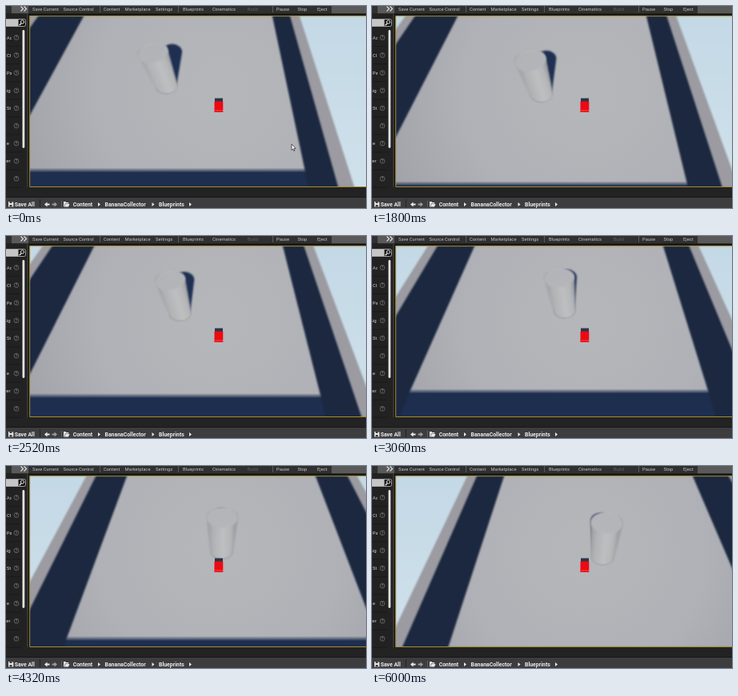
An HTML page with a canvas for the animation above (6030 ms loop, 450x253 px).

```html
<!DOCTYPE html>
<html lang="en">
<head>
<meta charset="utf-8">
<title>Level editor viewport</title>
<style>
  html, body { margin: 0; width: 100%; height: 100%; overflow: hidden; background: #242425; }
  canvas, svg { position: absolute; left: 0; top: 0; width: 450px; height: 253px; }
  text { font-family: Roboto, "Open Sans", sans-serif; }
  .tool { font-size: 5.8px; fill: #c4c4c4; }
  .crumb { font-size: 6.9px; font-weight: 700; fill: #ececec; }
  .side { font-size: 6px; fill: #cfcfcf; }
  .help { font-size: 5px; fill: #8c8c8c; text-anchor: middle; }
</style>
</head>
<body>
<canvas id="view" width="450" height="253"></canvas>
<svg id="ui" viewBox="0 0 450 253">
  <rect width="450" height="9.500" fill="#303031"/>
  <path d="M7 0H28V9.500H7zM407 0H450V9.500H407z" fill="#5a5a5b"/>
  <path d="M117.500 0V8M215.500 0V8M333.500 0V8" stroke="#5a5a5b"/>
  <rect y="9.500" width="450" height="2.500" fill="#19191a"/>
  <rect y="227" width="450" height="13" fill="#232324"/>
  <rect y="240" width="450" height="13" fill="#3d3d3f"/>
  <rect y="239" width="450" height="1" fill="#161617"/>
  <rect y="10" width="27" height="217" fill="#222223"/>
  <rect x="27" y="10" width="2.500" height="217" fill="#151516"/>
  <path d="M27 10V227" stroke="#4c4c4d"/>
  <rect x="-3" y="16.500" width="27.500" height="9" rx="2" fill="#111" stroke="#a5a5a5"/>
  <rect y="17" width="15.500" height="8" fill="#c6c6c6"/>
  <g fill="none" stroke="#e6e6e6">
    <path d="M18.5 .5l3 3-3 3M22.5 .5l3 3-3 3" stroke-width="1.1"/>
    <circle cx="20.500" cy="20" r="2.1"/><path d="M19 21.700l-2.400 2.500" stroke-width="1.4"/>
  </g>
  <g id="rows"></g>
  <rect x="20.500" y="30" width="2.800" height="148" rx="1.400" fill="#e2e2e2"/>
  <path d="M450 12.700H29.700V226.500H450" fill="none" stroke="#a78d2c"/>
  <g fill="#e8e8e8">
    <path d="M3 245h5l1.300 1.300V251.500H3z"/>
    <path d="M48 248.500l3.500-3v2h3v2h-3v2z"/>
    <path d="M64 248.500l-3.500-3v2h-3v2h3v2z" fill="#9c9c9c"/>
    <path d="M72 251.500v-6.500h2.500l.8 1h3v1.500h-4.300l-1.300 4zM73 251.500l1.500-3.400h5l-1.500 3.400z"/>
    <path d="M115 246l3 2.500-3 2.500zM182.500 246l3 2.500-3 2.500zM229 246l3 2.500-3 2.500z"/>
  </g>
  <path d="M4.500 245h3v2h-3zM4.500 249h3v2.500h-3z" fill="#3d3d3f"/>
  <path d="M42.500 242v10" stroke="#222"/>
  <path d="M69.500 244v8" stroke="#606062"/>
</svg>
<script>
const LOOP = 6030;
const ctx = document.getElementById("view").getContext("2d");
const ui = document.getElementById("ui");

function label(cls, x, y, str, parent = ui) {
  const t = document.createElementNS("http://www.w3.org/2000/svg", "text");
  t.setAttribute("class", cls);
  t.setAttribute("x", x);
  t.setAttribute("y", y);
  t.textContent = str;
  parent.append(t);
  return t;
}

[["Save Current", 33], ["Source Control", 71.5], ["Content", 122], ["Marketplace", 148.5],
 ["Settings", 187], ["Blueprints", 221], ["Cinematics", 258], ["Build", 302],
 ["Pause", 338], ["Stop", 364.5], ["Eject", 389]].forEach(([s, x]) => {
  const t = label("tool", x, 5.7, s);
  if (s === "Build") t.style.fill = "#626262";
});
[["Save All", 10.7], ["Content", 83.7], ["BananaCollector", 123.5], ["Blueprints", 191]]
  .forEach(([s, x]) => label("crumb", x, 250.800, s));

// Field names are cut off by the narrow column.
const rows = document.getElementById("rows");
["Ac", "Cl", "Pa", "Lig", "St", "", "e", "ver", ""].forEach((s, i) => {
  const y = 39.5 + i * 22.1;
  label("side", s.length > 2 ? -2.5 : 0.8, y + 2.2, s, rows);
  rows.insertAdjacentHTML("beforeend",
    `<rect x="7" y="${y - 5}" width="12" height="10" fill="#222223"/>
     <path d="M0 ${y + 11}H19" stroke="#1a1a1b"/>
     <circle cx="13" cy="${y}" r="2.9" fill="none" stroke="#7c7c7c" stroke-width=".7"/>`);
  label("help", 13, y + 1.8, "?", rows);
});

// Perspective: every line running away from the viewer meets at VP.
const VP = { x: 267, y: -300 };
const TOP = 13, BOTTOM = 227, REF = TOP - VP.y;
const HALF = 118, RISE = 1.335, THICK = 12;
const FRONT = -0.000519, BACK = 0.000793, SHADE = 0.0003;

const px = (x, y) => VP.x + x * (y - VP.y) / REF;
const py = depth => 1 / depth + VP.y;

// time, sideways place of the arena, screen height of the pillar's base
const path = [
  [0, -52, 100.5], [1290, -52, 100.5], [1800, -42, 111], [2520, -39, 97], [3570, -4, 90],
  [4320, 2, 107], [5130, 5, 147], [6000, 16, 114.5], [LOOP, 16, 114.5]
];

function pose(t) {
  let i = 1;
  while (i < path.length - 1 && path[i][0] < t) i++;
  const a = path[i - 1], b = path[i];
  const k = (t - a[0]) / (b[0] - a[0]);
  return { x: a[1] + (b[1] - a[1]) * k, base: a[2] + (b[2] - a[2]) * k };
}

function shades(gradient, ...stops) {
  stops.forEach(s => gradient.addColorStop(...s));
  return gradient;
}

const floor = shades(ctx.createRadialGradient(266, 105, 30, 266, 105, 280),
  [0, "#b5b6ba"], [0.5, "#b0b1b6"], [1, "#9fa1a8"]);
const sky = shades(ctx.createLinearGradient(0, TOP, 0, BOTTOM),
  [0, "#c4d9e6"], [1, "#cfe1eb"]);

function poly(color, pts) {
  ctx.fillStyle = color;
  ctx.beginPath();
  pts.forEach(p => ctx.lineTo(...p));
  ctx.closePath();
  ctx.fill();
}

// Fills the shape swept from one ellipse [x, y, rx, ry] to another.
function sweep(color, a, b) {
  ctx.fillStyle = color;
  ctx.beginPath();
  for (let i = 0; i <= 48; i++) {
    const [x, y, rx, ry] = a.map((v, j) => v + (b[j] - v) * i / 48);
    ctx.moveTo(x + rx, y);
    ctx.ellipse(x, y, rx, ry, 0, 0, Math.PI * 2);
  }
  ctx.fill();
}

function wall(side, x, back) {
  const foot = x + side * HALF;
  const rim = foot * RISE, outer = rim + side * THICK;
  const far = VP.x + side * 400;
  const edge = v => [[px(v, 260), 260], [px(v, 0), 0]];
  const beyond = [[far, 0], [far, 260]];
  const corner = px(foot, back);
  poly("#1b2840", [[px(foot, 260), 260], [corner, back],
    [corner + side * 10, back - 30], ...beyond]);
  poly("#9b9ba1", [...edge(rim), ...beyond]);
  poly(sky, [...edge(outer), ...beyond]);
}

function pillar(x, base) {
  const depth = 1 / (base - VP.y);
  const bx = px(x, base);
  const tx = VP.x + (bx - VP.x) * 1.25, ty = base * 0.9 - 31.5;
  const sy = py(depth + SHADE);
  const foot = [bx, base, 14 + (base - 90) * 0.03, 10];
  const head = [tx, ty, 18.7 + (ty - 49) * 0.06, 11 + (ty - 49) * 0.09];
  sweep("#1e2f52", [bx, base, 12.5, 9], [px(x, sy), sy, 12.5, 10]);

  const mx = (tx + bx) / 2, my = (ty + base) / 2;
  const lean = (bx - tx) / (base - ty);
  const side = shades(
    ctx.createLinearGradient(mx - 17, my + 17 * lean, mx + 17, my - 17 * lean),
    [0, "#a0a1a4"], [0.2, "#b2b3b5"], [0.55, "#bebfc0"], [0.82, "#b5b6b8"], [1, "#9a9b9f"]);
  sweep(side, head, foot);

  ctx.fillStyle = floor;
  ctx.beginPath();
  ctx.ellipse(...head, -(VP.x - tx) * 0.0035, 0, Math.PI * 2);
  ctx.fill();
}

function cube() {
  ctx.fillStyle = "#2b3448";
  ctx.fillRect(261, 115.5, 10, 5);
  ctx.fillStyle = "#ec0a12";
  ctx.fillRect(260.5, 119.5, 10.8, 13.5);
  ctx.fillStyle = "#ff8c8c";
  for (let x = 262; x < 271; x += 2) ctx.fillRect(x, 130.5, 1, 1);
}

function cursor(t) {
  if (t >= 660) return;
  const k = Math.max(0, t - 30) / 630;
  const x = 357 - 57 * k, y = 173 - 55 * k;
  const shape = [[0, 0], [0, 7.5], [1.7, 6], [2.9, 8.6], [4, 8.1], [2.9, 5.5], [5.2, 5.4]];
  poly("#f8f8f8", shape.map(([a, b]) => [x + a, y + b]));
  ctx.strokeStyle = "#222";
  ctx.lineWidth = 0.7;
  ctx.stroke();
}

function draw(t) {
  const { x, base } = pose(t);
  const depth = 1 / (base - VP.y);
  const front = py(depth + FRONT), back = py(depth + BACK);
  ctx.save();
  ctx.beginPath();
  ctx.rect(29, TOP - 1, 421, BOTTOM - TOP + 1);
  ctx.clip();

  ctx.fillStyle = floor;
  ctx.fillRect(0, 0, 450, 253);
  ctx.fillStyle = shades(ctx.createLinearGradient(0, front - 3, 0, front + 3),
    [0, "#1e2e4e00"], [1, "#1e2e4e"]);
  ctx.fillRect(0, front - 3, 450, 253);

  ctx.filter = "blur(0.8px)";
  wall(-1, x, back);
  wall(1, x, back);
  const hidesCube = base > 120;
  if (hidesCube) cube();
  pillar(x, base);
  ctx.filter = "none";
  if (!hidesCube) cube();
  cursor(t);
  ctx.restore();
}

const start = performance.now();
function tick() {
  draw((performance.now() - start) % LOOP);
  requestAnimationFrame(tick);
}
tick();
</script>
</body>
</html>
```
